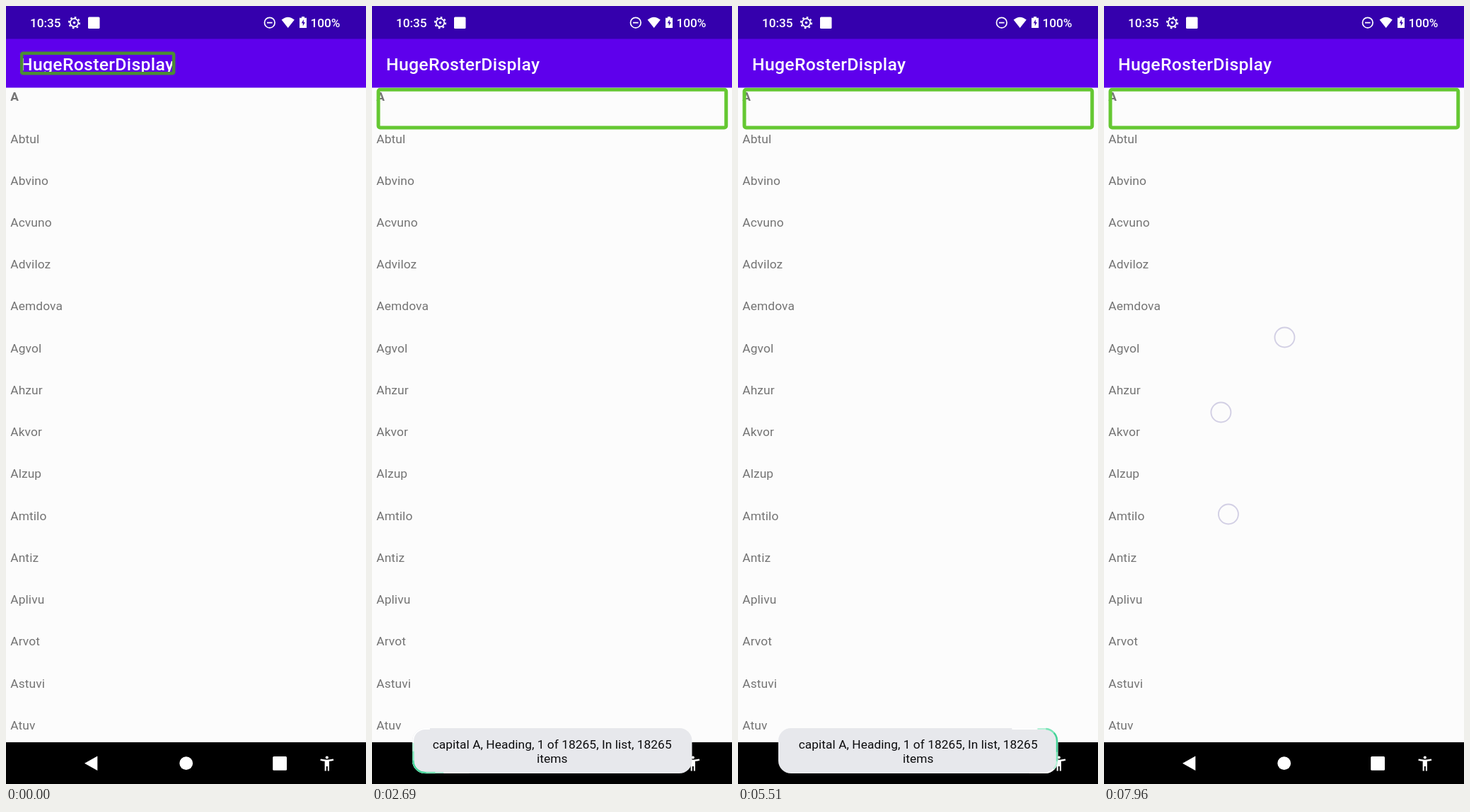
These frames come from a looping animation (509 px wide and 1100 px high, 7.99 s). An HTML page:

```html
<!DOCTYPE html>
<html lang="en">
<head>
<meta charset="utf-8">
<title>Screen reader on a long list</title>
<style>
  html, body { margin: 0; width: 100%; height: 100%; overflow: hidden; background: #fcfcfc; }
  svg { display: block; width: 100%; height: 100%; font-family: Roboto, sans-serif; }
  .status { font-size: 17.2px; font-weight: 500; fill: #fff; }
  .title { font-size: 24.75px; font-weight: 500; letter-spacing: .31px; fill: #fff; }
  .row { font-size: 17.33px; letter-spacing: .1px; fill: #747474; }
  .row:first-child { font-weight: 700; }
  .speech { font-size: 17.33px; letter-spacing: .05px; fill: #0c0c0e; text-anchor: middle; }
  .line { fill: none; stroke: #fff; }
  .glow { fill: none; }
</style>
</head>
<body>
<svg viewBox="0 0 509 1100" preserveAspectRatio="none">
  <defs>
    <path id="edge" pathLength="881" d="M58.2 1067a17 17 0 0 0 17 17H434a17 17 0 0 0 17-17V1039a17 17 0 0 0-17-17H75.2a17 17 0 0 0-17 17Z"/>
  </defs>
  <rect width="509" height="1100" fill="#fcfcfc"/>
  <g id="list"></g>

  <rect width="509" height="47" fill="#3500ad"/>
  <rect y="46.5" width="509" height="69" fill="#5e00ec"/>
  <text class="title" x="20" y="90.5">HugeRosterDisplay</text>

  <g fill="#fff">
    <text class="status" x="34" y="29.6">10:35</text>
    <circle class="line" cx="96.5" cy="23.6" r="5.7" stroke-width="1.7"/>
    <circle class="line" cx="96.5" cy="23.6" r="7.5" stroke-width="2.2" stroke-dasharray="2.6 3.29"/>
    <circle cx="96.5" cy="23.6" r="1.8"/>
    <rect x="116" y="15.5" width="16.5" height="16.5" rx="1.5"/>
    <circle class="line" cx="372.8" cy="23.6" r="7.3" stroke-width="1.7"/>
    <path class="line" d="M369 23.6h7.6" stroke-width="1.8"/>
    <path d="M389.6 19.6Q398.6 12 407.8 19.6L398.7 31Z"/>
    <path d="M418 15h4v1.7h3V31h-10V16.7h3Z"/>
    <path d="M420.8 19l-3 5.3h2v4l3-5.3h-2Z" fill="#3500ad"/>
    <text class="status" x="430.5" y="29.6">100%</text>
  </g>

  <rect y="1041" width="509" height="59" fill="#000"/>
  <g fill="#fff">
    <path d="M111 1070.7L129.3 1060.5V1081Z"/>
    <circle cx="254.7" cy="1070.7" r="9.4"/>
    <rect x="377.2" y="1061" width="19.8" height="19.8" rx="1.5"/>
    <g transform="translate(441.2 1058.3) scale(1.05)">
      <circle cx="12" cy="4" r="2"/>
      <path d="M20.5 6Q12 8 3.5 6L3 8q3 .8 6 1v13h2v-6h2v6h2V9q3-.2 6-1Z"/>
    </g>
  </g>

  <rect id="titleFocus" x="22.2" y="66.7" width="215" height="28.5" rx="2" fill="none" stroke="#4b8c34" stroke-width="4.5"/>
  <rect id="rowFocus" x="9" y="118.2" width="491.7" height="53.7" rx="2.5" fill="none" stroke="#65c832" stroke-width="5"/>

  <g id="toast">
    <rect x="57" y="1021" width="395.5" height="64" rx="18" fill="#e7e8ec"/>
    <g id="glow"></g>
    <text class="speech" x="254.7" y="1050">capital A, Heading, 1 of 18265, In list, 18265</text>
    <text class="speech" x="254.7" y="1070.3">items</text>
  </g>
  <g id="touches" fill="none" stroke="#d2cfe4" stroke-width="1.9"></g>
</svg>
<script>
const LOOP = 7990, EDGE = 881, FOCUS_AT = 2240;
const $ = id => document.getElementById(id);

function add(parent, tag, attrs, text) {
  const el = document.createElementNS("http://www.w3.org/2000/svg", tag);
  for (const key in attrs) el.setAttribute(key, attrs[key]);
  if (text) el.textContent = text;
  return parent.appendChild(el);
}

const names = ["A", "Abtul", "Abvino", "Acvuno", "Adviloz", "Aemdova", "Agvol", "Ahzur",
  "Akvor", "Alzup", "Amtilo", "Antiz", "Aplivu", "Arvot", "Astuvi", "Atuv"];
names.forEach((name, i) =>
  add($("list"), "text", { class: "row", x: 6.3, y: 134.3 + i * 59.23 }, name));

// Stacked dashes make a highlight that fades towards its ends.
const glows = [[150, "#fff", 1.8], [78, "#b4f0d6", 2.2], [54, "#7be5b8", 2.4], [28, "#45d298", 2.2]]
  .map(([length, stroke, width]) => ({
    length,
    el: add($("glow"), "use", {
      href: "#edge", class: "glow", stroke, "stroke-width": width,
      "stroke-dasharray": `${length} ${EDGE - length}`
    })
  }));

// Start and end of each finger's drag.
const fingers = [
  [379, 504, 255.5, 468.5],
  [328.5, 633, 165.5, 574.5],
  [320, 759, 176, 718.5]
].map(path => ({ path, el: add($("touches"), "circle", { r: 14 }) }));

// Time and distance travelled counterclockwise round the toast.
const glowSteps = [[2450, -180], [2690, 13], [3930, 1003], [5510, 2200], [6940, 3202], [7990, 3960]];
const fadeSteps = [[2450, 0], [2570, 1], [7450, 1], [7570, 0]];
const dragSteps = [[6850, -.06], [6940, 0], [7450, .52], [7960, 1], [7990, 1.02]];

function at(steps, t) {
  if (t <= steps[0][0]) return steps[0][1];
  for (let i = 1; i < steps.length; i++) {
    const [t0, v0] = steps[i - 1], [t1, v1] = steps[i];
    if (t <= t1) return v0 + (v1 - v0) * (t - t0) / (t1 - t0);
  }
  return steps[steps.length - 1][1];
}

const show = (el, on) => el.setAttribute("visibility", on ? "visible" : "hidden");

function draw(t) {
  show($("titleFocus"), t < FOCUS_AT);
  show($("rowFocus"), t >= FOCUS_AT);
  $("toast").setAttribute("opacity", at(fadeSteps, t));

  const place = at(glowSteps, t) % EDGE;
  for (const { el, length } of glows) el.setAttribute("stroke-dashoffset", length / 2 - place);

  show($("touches"), t >= dragSteps[0][0]);
  const k = at(dragSteps, t);
  for (const { el, path: [x0, y0, x1, y1] } of fingers) {
    el.setAttribute("cx", x0 + (x1 - x0) * k);
    el.setAttribute("cy", y0 + (y1 - y0) * k);
  }
}

const start = performance.now();
function tick() {
  draw((performance.now() - start) % LOOP);
  requestAnimationFrame(tick);
}
tick();
</script>
</body>
</html>
```
